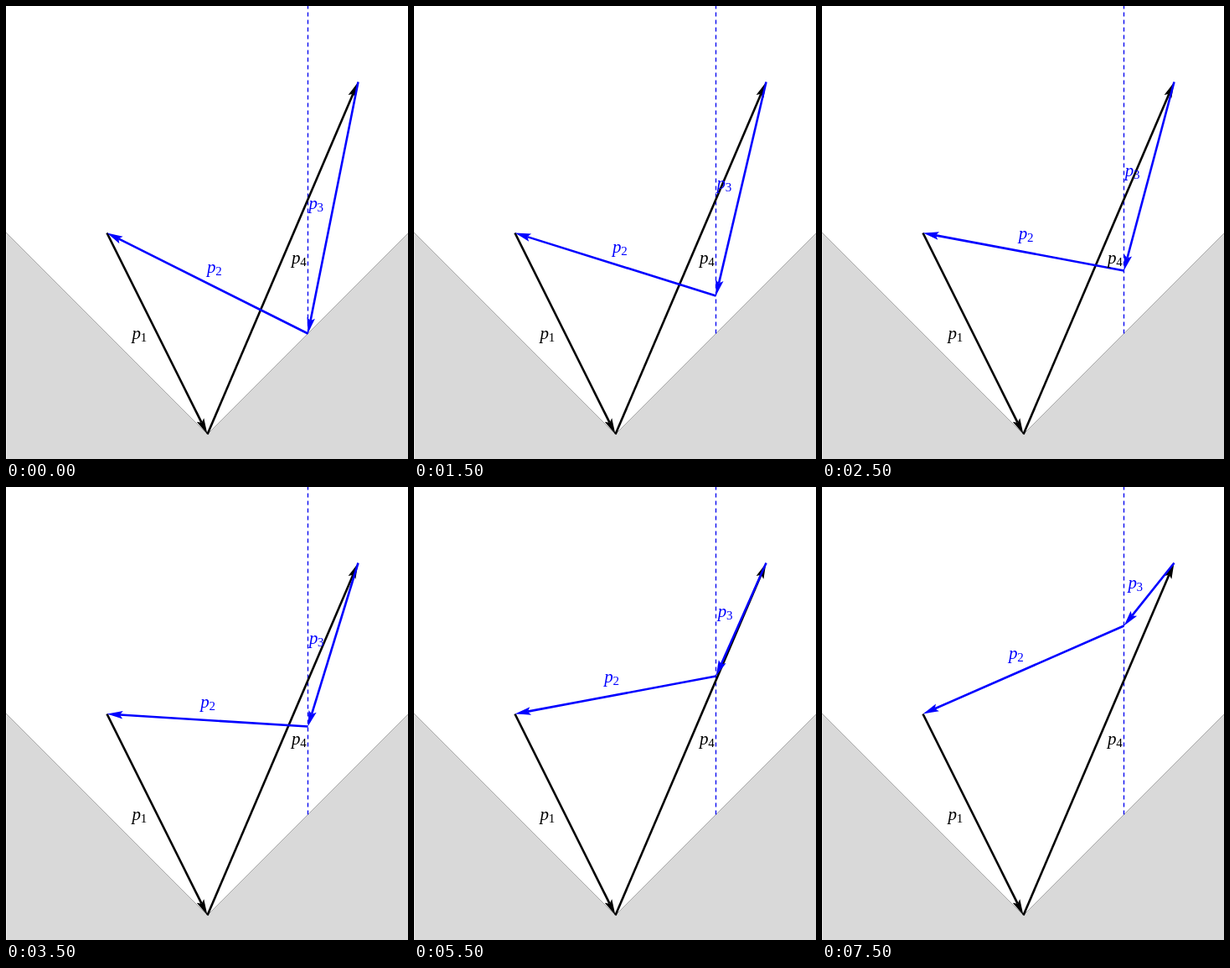
These frames come from a looping animation (480 px wide and 540 px high, 8 s). An HTML page:

```html
<!DOCTYPE html>
<html>
<head>
<meta charset="utf-8">
<style>
  html, body { margin: 0; width: 100%; height: 100%; overflow: hidden; background: #fff; }
  svg { display: block; width: 480px; height: 540px; }
  text { font: italic 21px "Liberation Serif", "Times New Roman", serif; }
  tspan { font-style: normal; font-size: 15px; }
</style>
</head>
<body>
<svg viewBox="0 0 480 540">
  <path d="M.5 270.5L240.5 510.5L480 271V540H.5Z" fill="#d9d9d9"/>
  <path d="M0 270L240.5 510.5L480 271" fill="none" stroke="#999" stroke-width=".8"/>
  <path d="M360.5 390.5V0" stroke="#00e" stroke-width="1.3" stroke-dasharray="5 4"/>
  <g id="arrows"></g>
</svg>
<script>
const HEAD = 19, NOTCH = 15.5, LABEL_GAP = 20;
const STEP_MS = 500, STEPS = 16;
const start = [120.5, 270.5], vertex = [240.5, 510.5], top_ = [420.5, 90.5];
const group = document.getElementById('arrows');

function arrow([x1, y1], [x2, y2], color) {
  const length = Math.hypot(x2 - x1, y2 - y1);
  const angle = Math.atan2(y2 - y1, x2 - x1) * 180 / Math.PI;
  return `<g transform="translate(${x2} ${y2}) rotate(${angle})" fill="${color}">
    <path d="M${-length} 0H${-NOTCH}" stroke="${color}" stroke-width="2.6"/>
    <path d="M0 0Q-10 -2.4 ${-HEAD} -4.8L${-NOTCH} 0L${-HEAD} 4.8Q-10 2.4 0 0Z"/></g>`;
}

function label(n, x, y, color) {
  return `<text x="${x - 8.5}" y="${y + 3}" fill="${color}">p<tspan x="${x + 1.7}" dy="3">${n}</tspan></text>`;
}

// Places a label beside the middle of a segment, on its upper left side.
function sideLabel(n, [x1, y1], [x2, y2], color) {
  const dx = x2 - x1, dy = y2 - y1, k = LABEL_GAP / Math.hypot(dx, dy);
  return label(n, (x1 + x2) / 2 - dy * k * -1 - 1, (y1 + y2) / 2 - dx * k * -1 + 2, color)
}

function draw(step) {
  const moving = [360.5, 390.5 - 15 * step];
  // Normal (dy, -dx) of a leftward segment points up.
  const beside = (n, a, b) => {
    const dx = b[0] - a[0], dy = b[1] - a[1], k = LABEL_GAP / Math.hypot(dx, dy);
    return label(n, (a[0] + b[0]) / 2 - dy * k - 1, (a[1] + b[1]) / 2 + dx * k + 2, '#00f');
  };
  group.innerHTML =
    arrow(start, vertex, '#000') + arrow(vertex, top_, '#000') +
    arrow(top_, moving, '#00f') + arrow(moving, start, '#00f') +
    label(1, 159, 394, '#000') + label(4, 349.5, 304, '#000') +
    beside(2, moving, start) + beside(3, top_, moving);
}

let shown = -1;
function frame() {
  const step = Math.floor(performance.now() / STEP_MS) % STEPS;
  if (step !== shown) draw(shown = step);
  requestAnimationFrame(frame);
}
frame();
</script>
</body>
</html>
```
